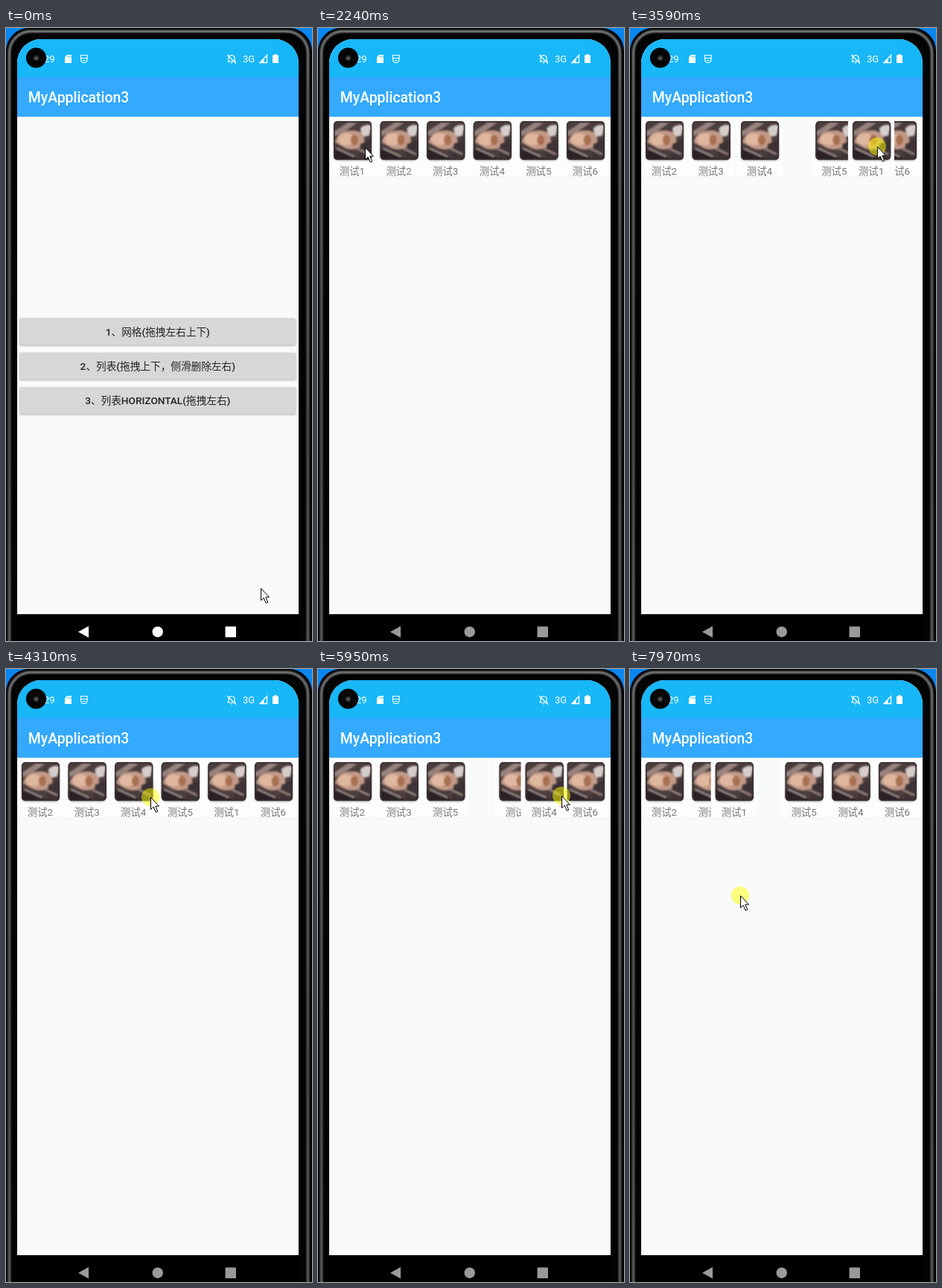
Animation, 411 px wide and 823 px high, one loop 8000 ms. Source, as an HTML page:

```html
<!DOCTYPE html>
<html lang="zh-CN">
<head>
<meta charset="utf-8">
<title>Drag list</title>
<style>
html, body { margin: 0; width: 100%; height: 100%; overflow: hidden; background: #0a86f0; }
svg { display: block; width: 100vw; height: 100vh; }
text { font-family: Roboto, "Noto Sans CJK SC", "Noto Sans CJK", sans-serif; }
.button { font-size: 13.65px; fill: #222; text-anchor: middle; }
.button tspan { font-weight: 500; }
.label { font-size: 13.4px; fill: #777; text-anchor: middle; }
.status { font-size: 13px; fill: #fff; }
</style>
</head>
<body>
<svg viewBox="0 0 411 823" preserveAspectRatio="none">
  <defs>
    <clipPath id="screenClip"><rect x="15" y="15" width="378" height="900" rx="32"/></clipPath>
    <clipPath id="photoClip"><rect x="6.2" y="5.5" width="51" height="52" rx="5"/></clipPath>
    <linearGradient id="rim" x1="0" y1="0" x2="0" y2="1">
      <stop offset="0" stop-color="#6a6a6a"/><stop offset=".1" stop-color="#555"/>
      <stop offset=".6" stop-color="#444"/><stop offset="1" stop-color="#555"/>
    </linearGradient>
    <filter id="soft"><feGaussianBlur stdDeviation=".9"/></filter>
    <filter id="shade" x="-10%" y="-10%" width="120%" height="125%"><feGaussianBlur stdDeviation="1"/></filter>
    <g id="photo">
      <rect x="6.2" y="6.5" width="51" height="52" rx="6" fill="#222" opacity=".5" filter="url(#shade)"/>
      <g clip-path="url(#photoClip)">
        <rect x="5" y="4" width="54" height="56" fill="#4a3d3d"/>
        <g filter="url(#soft)">
          <path d="M6 20L26 7 38 8 20 20 8 26Z" fill="#97827e"/>
          <path d="M42 15Q50 8 57 12L54 25 44 27Z" fill="#d5cdca"/>
          <path d="M8 34Q12 17 34 18 50 20 47 36 38 47 22 42Z" fill="#c29a87"/>
          <ellipse cx="23" cy="30" rx="11" ry="8" fill="#e0b79f"/>
          <ellipse cx="34" cy="31" rx="5" ry="7" fill="#a96f50"/>
          <path d="M5 42L22 45 44 60H5Z" fill="#2a2328"/>
          <path d="M42 36L60 29V60H40Z" fill="#3c3034"/>
          <path d="M10 42L34 53" stroke="#a2918d" stroke-width="2"/>
          <path d="M37 42L54 50" stroke="#927f7a" stroke-width="2.5"/>
        </g>
      </g>
      <rect x="7" y="6.3" width="49.5" height="50.5" rx="4.5" fill="none" stroke="#3a3030" stroke-width="1.5"/>
    </g>
  </defs>

  <rect width="411" height="823" fill="#0a86f0"/>
  <rect width="411" height="900" rx="31" fill="#030303"/>
  <rect x="4.5" y="4.5" width="401" height="900" rx="29" fill="none" stroke="#262626" stroke-width="6"/>
  <rect x="4.5" y="4.5" width="401" height="900" rx="29" fill="none" stroke="url(#rim)" stroke-width="3"/>

  <g clip-path="url(#screenClip)">
    <rect x="15" y="15" width="378" height="773" fill="#f9fbfa"/>
    <g id="menu"></g>
    <g id="page">
      <rect x="15" y="119" width="378" height="669" fill="#f9fafa"/>
      <g id="list"></g>
    </g>
    <rect x="15" y="119" width="378" height="1" fill="#9bb" opacity=".3"/>
    <rect x="15" y="15" width="378" height="52" fill="#17b7f8"/>
    <rect x="15" y="66" width="378" height="53" fill="#33a9ff"/>
    <text x="29.8" y="100" font-size="19.4" font-weight="500" fill="#fff">MyApplication3</text>
    <text class="status" x="51" y="46">29</text>
    <path d="M82 36H88V47H79V39Z" fill="#fff"/>
    <path d="M83 37.5V40M85 37.5V40M87 37.5V40" stroke="#17b7f8" stroke-width=".8"/>
    <path d="M100.5 36.5H109V42Q109 46.5 104.7 46.5T100.5 42ZM100.5 40.5H109M103 43.5H106.5" fill="none" stroke="#fff" stroke-width="1.2"/>
    <path d="M299 45H307V40Q307 37 303 36.5 299 37 299 40ZM297.5 45H308.5M297 36L309 47.5M302 47H304" fill="none" stroke="#fff" stroke-width="1.2"/>
    <text class="status" x="318" y="46">3G</text>
    <path d="M341 46.5H350.5V36.5Z" fill="none" stroke="#fff" stroke-width="1.3"/>
    <path d="M346.5 41V46.5H341Z" fill="#fff"/>
    <path d="M358 36.5H360.5V35H363.5V36.5H366V47H358Z" fill="#fff"/>
    <circle cx="40.5" cy="40" r="13.6" fill="#050505"/>
    <circle cx="40.5" cy="40.5" r="4" fill="#292929"/>
    <circle cx="40.5" cy="40.5" r="1.5" fill="#777"/>
    <rect x="15" y="787" width="378" height="36" fill="#000"/>
  </g>
  <g id="nav">
    <path d="M97 810.7L111 803V818.5Z"/>
    <circle cx="203.7" cy="810.7" r="7.2"/>
    <rect x="294.5" y="803.5" width="14.5" height="14.5" rx="1"/>
  </g>
  <g id="pointer">
    <circle id="press" r="12" fill="#ff0" opacity=".5"/>
    <path d="M.5 .5V16.5L4.2 13.2 7.2 20.2 9.7 19.2 6.8 12.2H11.5Z" fill="#fff" stroke="#000"/>
  </g>
</svg>
<script>
const LOOP = 8000, LEFT = 14.8, PITCH = 62.6, COUNT = 6;
const SLIDE = 250, LAG = 40, LONG_PRESS = 400;
const $ = id => document.getElementById(id);
const clamp = v => Math.min(1, Math.max(0, v));
const ease = v => (1 - Math.cos(Math.PI * clamp(v))) / 2;
const slotX = i => LEFT + i * PITCH;

const buttons = ['1、网格(拖拽左右上下)', '2、列表(拖拽上下，侧滑删除左右)', '3、列表HORIZONTAL(拖拽左右)'];
$('menu').innerHTML = buttons.map((label, i) => {
  const y = 389.5 + i * 46.3;
  const rich = label.replace(/[ -~]+/g, '<tspan>$&</tspan>');
  return `<rect x="18" y="${y + 1}" width="371.5" height="36.5" rx="2" fill="#777" opacity=".45" filter="url(#shade)"/>
    <rect x="18" y="${y}" width="371" height="36" rx="2" fill="#d6d8d7"/>
    <text class="button" x="203.8" y="${y + 23}">${rich}</text>`;
}).join('');

const order = Array.from({ length: COUNT }, (_, i) => i);
$('list').innerHTML = order.map(i =>
  `<g><rect width="62" height="81" fill="#fdfdfd"/><path d="M0 80.7H62" stroke="#f2f3f3"/>
    <use href="#photo"/><text class="label" x="31.2" y="77">测试${i + 1}</text></g>`).join('');
const items = [...$('list').children];

// where the pointer rests; it glides from one stop to the next
const stops = [
  { till: 70, x: 342, y: 752 },
  { at: 330, till: 600, x: 235, y: 500 },
  { at: 890, till: 1030, x: 282, y: 374 },
  { at: 1440, till: 1440, x: 240, y: 310 },
  { at: 1790, till: 1830, x: 200, y: 163 },
  { at: 2330, till: 2940, x: 52, y: 160 },
  { at: 3580, till: 3850, x: 331.5, y: 159 },
  { at: 4250, till: 4790, x: 194, y: 172 },
  { at: 5150, till: 5150, x: 48, y: 176 },
  { at: 5380, till: 5430, x: 196, y: 172 },
  { at: 5860, till: 5990, x: 326.5, y: 170 },
  { at: 6220, till: 6290, x: 317, y: 246 },
  { at: 6850, till: 7310, x: 242, y: 160 },
  { at: 7930, till: LOOP, x: 148, y: 304 }
];

function pointerAt(t) {
  const i = stops.findIndex(s => t < s.till);
  const to = stops[i < 0 ? stops.length - 1 : i];
  const from = stops[i - 1];
  if (!from || t >= to.at) return to;
  const k = ease((t - from.till) / (to.at - from.till));
  return { x: from.x + (to.x - from.x) * k, y: from.y + (to.y - from.y) * k };
}

const drags = [
  { item: 0, start: 2770, end: 3800 },
  { item: 3, start: 4640, end: 6000 },
  { item: 0, start: 7310, end: LOOP }
];
const presses = [{ start: 480, end: 600 }, ...drags.map(d => ({ start: d.start - LONG_PRESS, end: d.end }))];

const pullAt = (drag, t) => pointerAt(Math.min(t, drag.end) - LAG).x - pointerAt(drag.start).x;

// a dragged item trades places with a neighbour once its edge passes that neighbour's edge
const shifts = [];
for (const drag of drags) {
  const first = order.indexOf(drag.item);
  for (let t = drag.start; t < drag.end; t += 5) {
    const x = slotX(first) + pullAt(drag, t);
    const here = order.indexOf(drag.item);
    const step = here < COUNT - 1 && x > slotX(here + 1) ? 1 : here > 0 && x < slotX(here - 1) ? -1 : 0;
    if (!step) continue;
    const other = order[here + step];
    order[here] = other;
    order[here + step] = drag.item;
    shifts.push({ item: other, at: t, by: -step * PITCH });
  }
  drag.travel = (order.indexOf(drag.item) - first) * PITCH;
}

function itemX(n, t) {
  let x = slotX(n);
  for (const s of shifts)
    if (s.item === n) x += s.by * ease((t - s.at) / SLIDE);
  for (const d of drags) {
    if (d.item !== n || t < d.start) continue;
    const pull = pullAt(d, t);
    x += pull + (d.travel - pull) * ease((t - d.end) / SLIDE);
  }
  return x;
}

function draw(t) {
  const held = drags.filter(d => t >= d.start).pop() || drags[0];
  const top = items[held.item];
  if ($('list').lastChild !== top) $('list').append(top);
  items.forEach((el, i) => el.setAttribute('transform', `translate(${itemX(i, t).toFixed(2)} 119.5)`));

  const shown = clamp((t - 1500) / 200);
  $('page').setAttribute('opacity', shown);
  $('menu').setAttribute('visibility', shown < 1 ? 'visible' : 'hidden');

  const level = Math.round(255 - 101 * clamp((t - 560) / 200));
  $('nav').setAttribute('fill', `rgb(${level},${level},${level})`);

  const { x, y } = pointerAt(t);
  $('pointer').setAttribute('transform', `translate(${Math.round(x)} ${Math.round(y)})`);
  const down = presses.some(p => t >= p.start && t < p.end);
  $('press').setAttribute('visibility', down ? 'visible' : 'hidden');
}

const begin = performance.now();
function tick() {
  draw((performance.now() - begin) % LOOP);
  requestAnimationFrame(tick);
}
tick();
</script>
</body>
</html>
```
